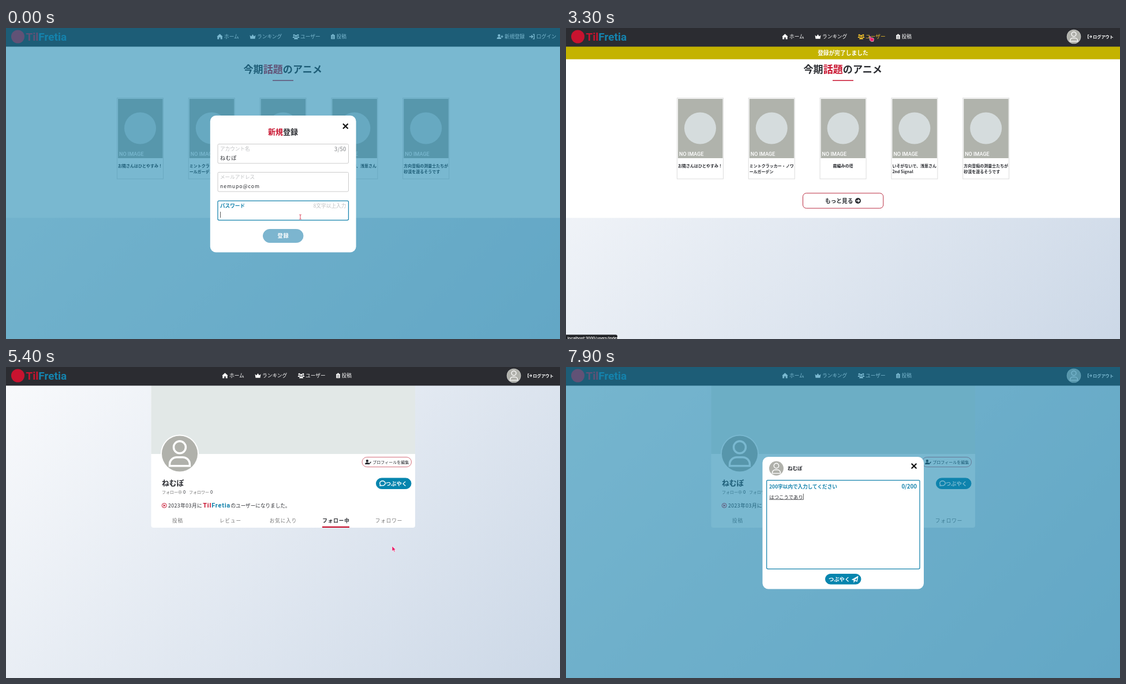
Animation, 960 px wide and 540 px high, one loop 8 s. Source, as an HTML page:

```html
<!DOCTYPE html>
<html lang="ja">
<head>
<meta charset="utf-8">
<title>TilFretia</title>
<style>
html, body { margin: 0; width: 100%; height: 100%; overflow: hidden; }
body { background: linear-gradient(135deg, #f9fafc, #ccd8e7); width: 960px; height: 540px; }
svg { display: block; font-family: 'Noto Sans CJK JP', 'Noto Sans CJK', 'Noto Sans', sans-serif; color: #2b2d32; }
text { fill: currentColor; white-space: pre; }
tspan { fill: currentColor; }
.b { font-weight: 700; }
.m { font-weight: 500; }
.c { text-anchor: middle; }
.e { text-anchor: end; }
.red { color: #c8132f; }
.teal { color: #1583ad; }
.grey { color: #777; }
.pale { color: #bfc1c3; }
.count { color: #a9abad; }
.white { color: #fff; }
.latin { font-family: Roboto, 'Liberation Sans', sans-serif; }
.sp { letter-spacing: .9px; }
.icon { fill: currentColor; }
.line { fill: none; stroke: currentColor; stroke-width: 1.4; }
.pill { color: #fff; }
.pill rect { fill: #0685ae; stroke: #0685ae; }
.pill.hover { color: #0c83ab; }
.pill.hover rect { fill: #fff; }
.pill.off rect { fill: #7cb5cf; stroke: #7cb5cf; }
.nav { color: #fff; }
.nav .hover { color: #f0c02a; }
.field { fill: #fff; stroke: #ccc; }
.field.focus { stroke: #1583ad; stroke-width: 1.25; }
.x { fill: none; stroke: #111; stroke-width: 2.2; }
.cursor path { fill: #e8206a; stroke: #fff; stroke-width: .6; }
.cursor .beam { fill: none; stroke: #e0556a; stroke-width: 1.1; }
</style>
</head>
<body>
<svg id="stage" width="960" height="540" viewBox="0 0 960 540"></svg>
<script>
const LOOP = 8000;
const OWNER = 'ねむぽ';
// moments of the story, in ms
const AT = { home: 2000, users: 3500, profile: 4600, unfollow: 5300, compose: 6600, focus: 6900 };

const text = (x, y, s, size, cls = '', id = '') =>
  `<text id="${id}" x="${x}" y="${y}" font-size="${size}" class="${cls}">${s}</text>`;
const span = (cls, s) => `<tspan class="${cls}">${s}</tspan>`;
const rect = (x, y, w, h, rx, attrs) =>
  `<rect x="${x}" y="${y}" width="${w}" height="${h}" rx="${rx}" ${attrs}/>`;
const fill = c => `fill="${c}"`;
const disc = (x, y, r, c) => `<circle cx="${x}" cy="${y}" r="${r}" fill="${c}"/>`;
const group = (id, body, cls = '') => `<g id="${id}" class="${cls}">${body}</g>`;
const path = (d, cls = 'icon') => `<path class="${cls}" d="${d}"/>`;
const dot = (x, y, r) => `<circle class="icon" cx="${x}" cy="${y}" r="${r}"/>`;

const person = dot(-1.2, -2.2, 2.3) + path('M-5.2 4.3a4 3.8 0 0 1 8 0z');
const ICONS = {
  home: path('M-5.2 0L0-4.8 5.2 0H4.2V4.6H1.2V1.3H-1.2V4.6H-4.2V0z'),
  crown: path('M-5-2.6L-2.3-.4 0-4 2.3-.4 5-2.6 4 3.8H-4z'),
  users: dot(-3.4, -2.8, 1.5) + dot(3.4, -2.8, 1.5) + dot(0, -1.2, 1.8) +
    path('M-5.8 2a2.4 2.4 0 0 1 4-1.8L-3 2zM5.8 2a2.4 2.4 0 0 0-4-1.8L3 2zM-3.4 4.5a3.4 3.2 0 0 1 6.8 0z'),
  clip: path('M-3.6-3.4h2a1.6 1.6 0 0 1 3.2 0h2V4.6h-7.2z') +
    '<path d="M-1.8-1h3.6M-1.8 1h3.6M-1.8 3h3.6" stroke="#2b2c31" stroke-width=".7"/>',
  add: person + path('M4.2-2.4V2M2-.2H6.4', 'line'),
  edit: person + path('M2 4L5.8-.4', 'line'),
  login: path('M1.5-4H4V4H1.5M-5 0H1.5M-1.2-2.7L1.5 0-1.2 2.7', 'line'),
  logout: path('M-1.5-4H-4V4H-1.5M-1.5 0H4.5M2-2.7L4.5 0 2 2.7', 'line'),
  search: '<circle class="line" cx="-1.2" cy="-1.2" r="3.7"/>' + path('M1.5 1.5L5.5 5.5', 'line') + dot(-1.2, -1.2, 1.3),
  comment: path('M-3.4 4.2L-4.4 3.8-3.6 2.3A4.8 4 0 1 1-1.4 3.6Q-2.4 4.2-3.4 4.2z', 'line'),
  play: '<circle class="line" r="3.9" style="stroke-width:1"/>' + path('M-1.3-2.1L2.2 0-1.3 2.1z'),
  more: dot(0, 0, 5) + '<path d="M-2.8 0H2.4M.2-2.4L2.6 0 .2 2.4" fill="none" stroke="#fff" stroke-width="1.3"/>',
  plane: path('M-4.6 .8L4.6-4.4 3.2 3.8-.3 2.2-1.8 4.4V1.6zM-1.8 1.6L4.6-4.4', 'line')
};
const icon = (name, x, y, k = 1, cls = '') =>
  `<g class="${cls}" transform="translate(${x} ${y}) scale(${k})">${ICONS[name]}</g>`;

const avatar = (x, y, r) => `<g transform="translate(${x} ${y}) scale(${r / 16})">
  <circle r="16" fill="#b0b1ab"/><g fill="none" stroke="#fff" stroke-width="1.8"><circle cy="-5.8" r="5.4"/>
  <path d="M-9 11V9.6A6.4 6.4 0 0 1-2.6 3.2H2.6A6.4 6.4 0 0 1 9 9.6V11z"/></g></g>`;
const pill = (id, x, y, w, h, body, cls = '') =>
  group(id, rect(x + .5, y + .5, w - 1, h - 1, (h - 1) / 2, '') + body, 'pill ' + cls);
const cross = (x, y) => path(`M${x - 4.3} ${y - 4.3}l8.6 8.6m0-8.6l-8.6 8.6`, 'x');

// Header
const navItem = (id, name, ix, tx, label, size = 8.7, k = 1) =>
  group(id, icon(name, ix, 15, k) + text(tx, 18.4, label, size, size < 8 ? 'b' : 'm'));
const menu = (key, dx) =>
  navItem(key + 'Home', 'home', 370.5 + dx, 378 + dx, 'ホーム') +
  navItem(key + 'Rank', 'crown', 427.5 + dx, 435 + dx, 'ランキング') +
  navItem(key + 'User', 'users', 502.5 + dx, 510 + dx, 'ユーザー') +
  navItem(key + 'Post', 'clip', 566.5 + dx, 572.5 + dx, '投稿', 8.7, .9);
const header = rect(0, 0, 960, 32.4, 0, fill('#2b2c31')) + disc(20.5, 15, 11.5, '#c8132f') +
  text(34.5, 22, span('red', 'Til') + span('teal', 'Fretia'), 19, 'b latin') +
  group('navOut', menu('out', 0) + navItem('join', 'add', 855.5, 864, '新規登録', 8.7, .95) +
    navItem('login', 'login', 911.5, 919, 'ログイン', 8.7, .95), 'nav') +
  group('navIn', menu('in', 9) + disc(880, 15, 12.3, '#d8d9d8') + avatar(880, 15, 11.7) +
    navItem('logout', 'logout', 907.5, 913, 'ログアウト', 7.2, .75), 'nav');

// Top page
const SHOWS = [['お隣さんはひとやすみ！'], ['ミントクラッカー・ノワ', 'ールガーデン'], ['霧編みの塔'],
  ['いそがないで、浅葱さん', '2nd Signal'], ['方向音痴の測量士たちが', '砂漠を渡るそうです']];
const show = (lines, i) => {
  const x = 192.5 + i * 123.8;
  return rect(x, 121.5, 80, 140.5, 0, 'fill="#fff" stroke="#ddd"') +
    rect(x + 1.5, 123, 77.5, 103, 0, fill('#b0b3ac')) + disc(x + 40, 174, 27.5, '#d5dcdd') +
    text(x + 3.5, 222, 'NO IMAGE', 9, 'm latin white') +
    (lines.length > 1 ? lines.map((s, j) => text(x + 1.5, 242 + j * 10.4, s, 7, 'b')).join('')
      : text(x + 40, 242, lines[0], 7, 'b c'));
};
const home = rect(0, 32, 960, 297.7, 0, fill('#fff')) +
  text(479.7, 78, `今期${span('red', '話題')}のアニメ`, 17.1, 'b c') +
  rect(462, 90.4, 36, 1.5, 0, fill('#c8132f')) + SHOWS.map(show).join('') +
  rect(410.5, 286.8, 139.3, 26.2, 6, 'fill="#fff" stroke="#bb2f44"') +
  text(449, 303.5, 'もっと見る', 9.7, 'b') + icon('more', 506, 300);
const banner = rect(0, 32, 960, 22.3, 0, fill('#c4b300')) + text(480, 47, '登録が完了しました', 9.75, 'b c white');
const status = rect(-4, 532.5, 93, 14, 3, fill('#222428')) + text(2.5, 540.5, '', 7.2, 'm white latin', 'url');

// User list
const counts = (x, y, size, a, b, step, id) =>
  text(x, y, 'フォロー中', size, 'grey') + text(x + step * .58, y, a, size * 1.08, 'm', id) +
  text(x + step * .74, y, 'フォロワー', size, 'grey') + text(x + step * 1.32, y, b, size * 1.08, 'm');
const row = (y, name, a, b, bio) =>
  rect(251.5, y, 457.5, bio ? 52.8 : 42, 4, fill('#fff')) + avatar(278, y + 20.8, 16) +
  text(301.5, y + 17.6, name, 11.2, 'm') + counts(302, y + 29.3, 5.3, a, b, 48.8) +
  (bio ? text(301.5, y + 44.2, bio, 8.6) : '');
const BIO = '私は深海底出身です。 日本はいい国ですね。';
const USERS = [['tilfretia', 0, 4], ['kemu', 0, 1], ['深海住人', 2, 1, BIO], ['I am マクラ', 2, 1],
  ['ドラマ日和', 2, 0, '習慣はアニメを見ることだけ。 ずっと見てます。 多分、俺の人生がアニメ。'],
  ['popku', 0, 1], ['mokunotane', 1, 0], ['砂辺　柚之介', 0, 0]];
let rowTop = 164.6;
const rows = USERS.map((u, i) => {
  const y = rowTop;
  rowTop += u[3] ? 58.2 : 47.3;
  return row(y, ...u) + (i === 6 ? disc(278, y + 20.8, 16, '#36404f') + disc(278, y + 19.5, 6, '#d9713c') : '') +
    pill('follow' + i, 641, y + 5.3, 57.5, 16,
      text(649.5, y + 16, 'フォロー', 7.2, 'b') + icon('add', 684.2, y + 13.3, .78));
}).join('');
const users = rect(251.5, 28, 457.5, 99, 4, fill('#fff')) +
  text(480.5, 62.7, span('red', 'ユーザー') + '一覧', 17.1, 'b c') +
  rect(298.5, 78.5, 317.5, 23.5, 11.7, fill('#d3dadc')) + icon('search', 316, 90) +
  text(329, 93.4, 'ユーザーを探す', 8.6, 'grey sp') +
  pill('find', 627, 81.5, 35.5, 18, text(644.7, 94, '検索', 9.6, 'b c')) + rows;

// Profile
const TABS = ['投稿', 'レビュー', 'お気に入り', 'フォロー中', 'フォロワー'];
const profile = rect(251.5, 28, 457.5, 251, 4, fill('#fff')) + rect(251.5, 32, 457.5, 119, 0, fill('#e2e8e7')) +
  disc(301, 150.5, 33, '#fff') + avatar(301, 150.5, 31) +
  rect(617, 156.5, 85.5, 17, 8.5, 'fill="#fff" stroke="#d4707d"') + icon('edit', 627, 165, .95) +
  text(635.3, 167.7, 'プロフィールを編集', 7) +
  text(270, 206.2, OWNER, 12.8, 'b') + counts(270, 219.7, 7, 1, 0, 63.6, 'following') +
  pill('tweet', 641, 192.5, 61.5, 19.5, icon('comment', 652.3, 202) + text(657.7, 205.8, 'つぶやく', 9.4, 'b')) +
  icon('play', 274.2, 240.5, 1, 'red') +
  `<g letter-spacing=".4">${text(281, 243.7, '2023年03月に', 8.8)}</g>` +
  `<g letter-spacing=".75">${text(341.3, 243.7, span('red', 'Til') + span('teal', 'Fretia'), 11, 'b latin')}</g>` +
  text(389.5, 243.7, 'のユーザーになりました。', 8.6) +
  TABS.map((s, i) => text(297.4 + i * 91.5, 269.6, s, 8.6, 'c sp ' + (i === 3 ? 'b' : 'm grey'))).join('') +
  rect(548, 276.8, 47, 2.2, 0, fill('#c8132f'));
const card = row(300.5, '深海住人', 2, 2, BIO) +
  pill('unfollow', 644.5, 305.8, 54, 16, text(671.5, 316.4, 'フォロー中', 7.3, 'b c'));

// Dialogs
const field = (y, label, cls, focus) =>
  rect(367, y + .5, 226.5, 33.5, 2, `class="field ${focus ? 'focus' : ''}"`) + text(371, y + 12.4, label, 8.6, cls);
const dots = Array.from({ length: 12 }, (_, i) => disc(373 + i * 4.13, 324.2, 1.3, '#222')).join('');
const signup = rect(353.8, 152, 252.8, 237.5, 10, fill('#fff')) +
  text(480, 185.3, span('red', '新規') + '登録', 13, 'b c') + cross(588.3, 170.5) +
  field(201, 'アカウント名', 'm pale') + text(589.5, 213.5, '3/50', 9.6, 'b e count') +
  text(371, 229.3, OWNER, 8.8, 'sp') +
  field(250, 'メールアドレス', 'm pale') + text(371, 278, 'nemupo@com', 8.7, 'sp') +
  field(299.5, 'パスワード', 'b teal', true) + text(589.5, 312, '', 8.7, 'e pale', 'hint') + group('dots', dots) +
  group('caret', rect(371.2, 319, .8, 10.5, 0, fill('#333'))) +
  pill('submit', 445, 349, 70.5, 24, text(480.5, 364.3, '登録', 9.2, 'b c sp'));
const compose = rect(340.5, 156, 279.5, 229.5, 10, fill('#fff')) + avatar(364.5, 176, 12.5) +
  text(384, 179.2, OWNER, 8.5, 'b') + cross(603, 172) +
  rect(347.7, 196.5, 265.3, 154, 2, 'id="area" class="field"') +
  group('areaLabel', text(352, 210.7, '200字以内で入力してください', 8.6, 'b') + text(608, 210.9, '0/200', 9.7, 'b e')) +
  '<text id="draft" x="352.3" y="228.6" font-size="8.4" text-decoration="underline"></text>' +
  '<rect id="draftCaret" y="220" width=".8" height="10.5" fill="#333"/>' +
  pill('send', 449, 359, 62.5, 18.5, text(455, 371.6, 'つぶやく', 9.3, 'b') + icon('plane', 501, 368.3));

const cursors = group('cursor',
  group('hand', path('M-3-4.5q1.2-.6 1.7.7l.8 2q2.5-.5 4 .3q1.2.8.8 3l-.6 2.8h-4l-2.5-2.6q-.6-1.2.8-1l-1.2-3.4z', '')) +
  group('arrow', path('M-3-5V4L-.8 2 .8 5.2 2.2 4.5.8 1.6H3.6z', '')) +
  group('beam', path('M-1.8-4Q0-4 0-2.8Q0-4 1.8-4M0-3V3M-1.8 4Q0 4 0 2.8Q0 4 1.8 4', 'beam')), 'cursor');

document.getElementById('stage').innerHTML =
  group('home', home) + group('banner', banner) + group('users', users) +
  group('profile', profile) + group('card', card) + header + group('status', status) +
  group('veil', rect(0, 0, 960, 540, 0, 'fill="rgb(21,130,172)" fill-opacity=".57"')) +
  group('signup', signup) + group('compose', compose) + cursors;

const el = id => document.getElementById(id);
const toggle = (id, on) => { el(id).style.display = on ? '' : 'none'; };
const mark = (id, cls, on) => el(id).classList.toggle(cls, on);
const clamp = (v, lo, hi) => Math.min(hi, Math.max(lo, v));
const within = (t, from, to) => t >= from && t < to;

// time, x, y, shape from that time on
const PATH = [[0, 510, 328, 'beam'], [1100, 510, 328, 'beam'], [1400, 500, 356, 'hand'], [1600, 497, 368, 'hand'],
  [AT.home, 497, 368, 'arrow'], [2400, 497, 368, 'arrow'], [3100, 529, 19, 'hand'], [AT.users, 529, 19, 'hand'],
  [3600, 540, 44, 'arrow'], [4000, 662, 281, 'hand'], [4400, 662, 281, 'hand'], [AT.profile, 674, 278, 'hand'],
  [4900, 672, 316, 'hand'], [AT.unfollow, 672, 316, 'arrow'], [5500, 672, 316, 'arrow'], [6200, 681, 201, 'hand'],
  [AT.compose, 681, 201, 'arrow'], [AT.focus, 470, 250, 'beam'], [LOOP, 470, 250, 'beam']];
const DRAFT = 'h,は,はt,はts,はつ,はつk,はつこ,はつこう,はつこうd,はつこうで,はつこうであ,はつこうであr,はつこうであり'.split(',');

function moveCursor(t) {
  const i = PATH.findIndex(p => p[0] > t) - 1;
  const [t0, x0, y0, shape] = PATH[i], [t1, x1, y1] = PATH[i + 1];
  const u = (t - t0) / (t1 - t0), k = u * u * (3 - 2 * u);
  el('cursor').setAttribute('transform', `translate(${x0 + (x1 - x0) * k} ${y0 + (y1 - y0) * k})`);
  for (const s of ['hand', 'arrow', 'beam']) toggle(s, s === shape);
  toggle('cursor', !within(t, 200, 1100) && t < AT.focus + 200);
}

function showPages(t) {
  const member = t >= AT.home, atProfile = t >= AT.profile;
  const onMenu = within(t, 3100, AT.users), onTab = within(t, 5700, 6000);
  toggle('navOut', !member);
  toggle('navIn', member);
  toggle('home', t < AT.users);
  toggle('banner', within(t, AT.home, AT.users));
  toggle('users', within(t, AT.users, AT.profile));
  toggle('profile', atProfile);
  toggle('card', within(t, AT.profile, AT.unfollow));
  toggle('veil', !member || t >= AT.compose);
  toggle('signup', !member);
  toggle('compose', t >= AT.compose);
  toggle('status', onMenu || onTab);
  el('url').textContent = 'localhost:3000/users/' + (onMenu ? 'index' : 'follower');
  mark('inUser', 'hover', onMenu || within(t, AT.users, 3600));
  mark('follow2', 'hover', within(t, 4000, AT.profile));
  mark('unfollow', 'hover', t >= 4900);
  mark('tweet', 'hover', within(t, 6200, AT.compose));
  el('following').textContent = t < AT.unfollow ? 1 : 0;
}

function typePassword(t) {
  const n = clamp(Math.round((t - 100) / 75), 0, 12);
  [...el('dots').children].forEach((d, i) => { d.style.display = i < n ? '' : 'none'; });
  el('hint').textContent = n || '8文字以上入力';
  el('caret').setAttribute('transform', `translate(${n * 4.13} 0)`);
  toggle('caret', t < 1500);
  mark('submit', 'off', n < 8);
}

function typeDraft(t) {
  const focus = t >= AT.focus, n = clamp(Math.round((t - 7080) / 63), 0, DRAFT.length);
  mark('area', 'focus', focus);
  el('areaLabel').setAttribute('class', focus ? 'teal' : 'pale');
  el('draft').textContent = n ? DRAFT[n - 1] : '';
  toggle('draftCaret', focus);
  if (focus) el('draftCaret').setAttribute('x', 352.3 + el('draft').getComputedTextLength());
}

const start = performance.now();
function tick() {
  const now = (performance.now() - start) % LOOP;
  const t = Math.floor((now + 5) / 100) * 100 % LOOP;
  showPages(t);
  typePassword(t);
  typeDraft(t);
  moveCursor(t);
  requestAnimationFrame(tick);
}
tick();
</script>
</body>
</html>
```
